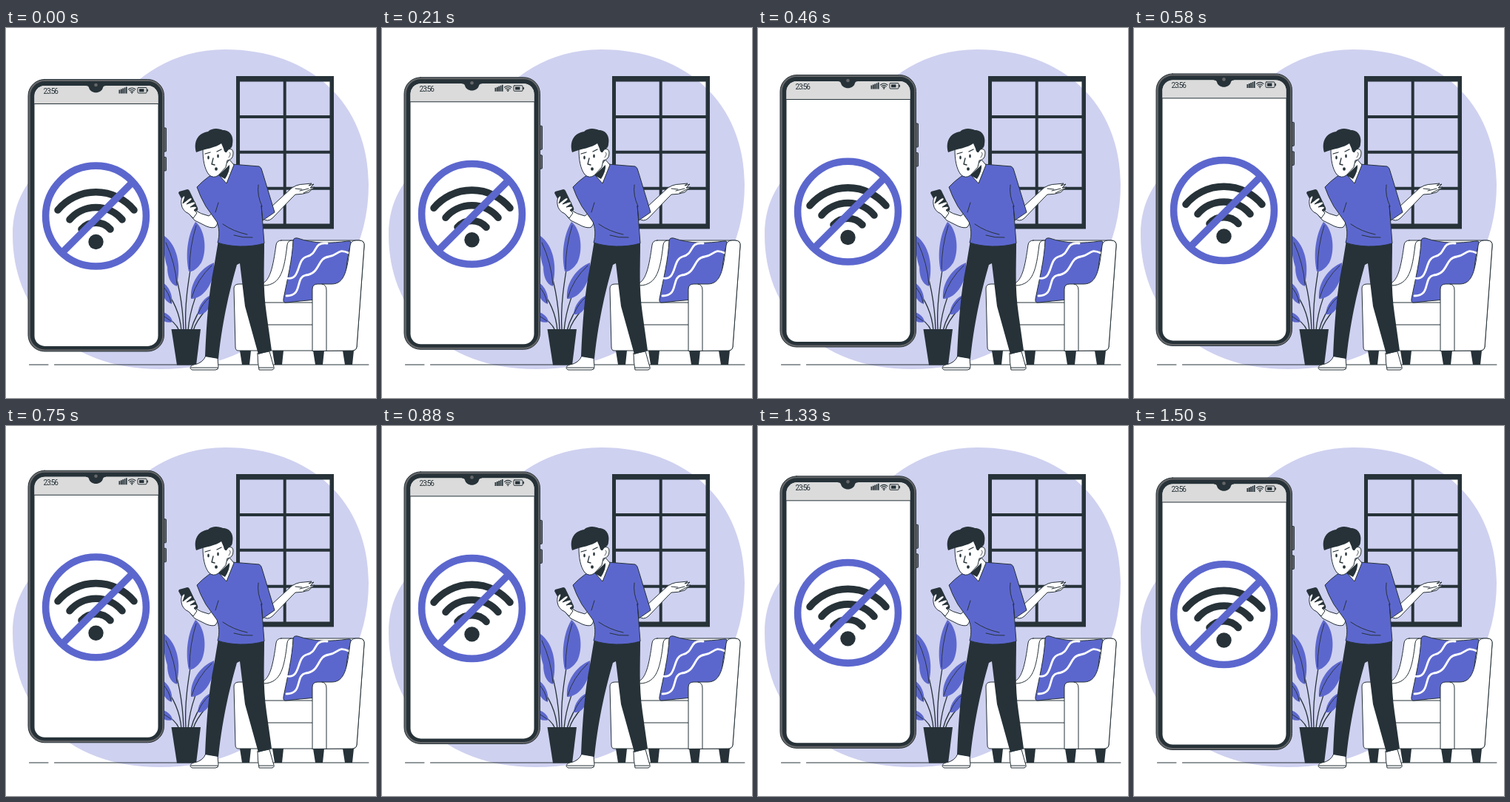
An HTML page for the animation above (1540 ms loop, 500 by 500 pixels).

```html
<!DOCTYPE html>
<html lang="en">
<head>
<meta charset="utf-8">
<title>No connection</title>
<style>
  html, body { margin: 0; width: 100%; height: 100%; overflow: hidden; background: #fff; }
  svg { display: block; width: 100vw; height: 100vh; }
  .ink { fill: #263238; }
  .blue { fill: #5c67ce; }
  .pale { fill: #cfd1f0; }
  .line { fill: none; stroke: #263238; stroke-linecap: round; stroke-linejoin: round; }
  .edge { stroke: #263238; stroke-linejoin: round; stroke-linecap: round; }
  .white { fill: #fff; }
  .clock { font: 10px Roboto, Arial, sans-serif; letter-spacing: -1.15px; }
</style>
</head>
<body>
<svg viewBox="0 0 500 500" xmlns="http://www.w3.org/2000/svg">
  <path class="pale" d="M296 29C413 29 490 103 490 212C490 292 452 356 388 398C330 434 288 461 208 461C78 461 9 378 9 280C9 185 96 162 140 110C176 66 224 29 296 29Z"/>
  <path class="line" d="M31.500 455H57M65.500 455H490"/>

  <g id="window">
    <path class="ink" fill-rule="evenodd" d="M311 65H443V271.500H311ZM316 72.500V264.500H437.500V72.500Z"/>
    <path class="line" stroke-width="4" d="M376.700 70V266M314 120H440M314 167.800H440M314 216.800H440"/>
  </g>

  <g id="chair">
    <path class="ink" d="M316 436H331L329 455H319ZM360 436H375L373 455H363ZM415 436H430L428 455H418ZM455 436H470L468 455H458Z"/>
    <g class="white edge">
      <path d="M372 287H477Q485 287 484 295L474 431Q473 436 468 436H314Q310 436 310 431L308 352Q308 346 315 346H342C357 346 361 321 365 293Q366 287 372 287Z"/>
      <path fill="none" d="M386 287Q381 287 380 293C376 326 372 347 349 348M348 371H414M350 401H414"/>
      <path class="blue" d="M388 287Q389 283 394 284C417 292 440 291 462 288Q467 287 466 292C460 310 460 329 458 350Q457 363 451 366C428 366 404 368 379 371Q374 372 375 366C380 340 387 313 388 287Z"/>
      <path fill="none" style="stroke:#fff" stroke-width="2.800" d="M379 338C399 342 392 313 406 309C423 305 414 289 434 291M379 362C402 362 390 337 405 334C425 332 420 311 436 309C450 307 448 297 463 304"/>
      <path d="M414 436V353Q414 346 421 346H440C458 346 461 327 465 294Q466 287 473 287H477Q485 287 484 295L474 431Q473 436 468 436Z"/>
      <path fill="none" d="M427 346Q433 347 433 354V436"/>
    </g>
  </g>

  <g id="plant">
    <g class="line" stroke-width="1.300">
      <path d="M240 409C239 374 234 342 217 294M243 409C240 358 253 314 258 268M246 409C249 374 261 347 277 323M250 409C253 396 260 382 273 366M237 409C235 384 224 364 212 350M234 409C230 399 222 393 211 388M253 409C256 398 263 389 271 380"/>
    </g>
    <g class="blue">
      <path d="M256 262C269 272 272 300 264 317C259 325 252 330 247 329C242 308 245 280 256 262Z"/>
      <path d="M214 281C228 291 235 312 233 333L231 349C221 346 218 334 218 323C213 308 212 294 214 281Z"/>
      <path d="M281 317C284 339 269 366 250 366C248 345 262 325 281 317Z"/>
      <path d="M208 342C219 346 226 360 224 373C214 370 208 357 208 342Z"/>
      <path d="M206 383C216 383 224 390 225 397C216 400 208 395 206 383Z"/>
      <path d="M279 360C278 376 271 388 259 387C260 374 268 364 279 360Z"/>
    </g>
    <path class="line" stroke-width=".9" d="M257 267Q248 296 248 326M216 290Q229 318 231 347M278 321Q258 340 251 364M211 348Q221 358 223 371M275 364Q265 373 260 385M208 386L223 396"/>
    <path class="ink" d="M223.500 407H263L257 455.500H231Z"/>
  </g>

  <g id="man">
    <g class="white edge">
      <path d="M270 443L286 446L287 458Q287 462 283 462H252C247 461 249 456 254 455Q266 453 270 443Z"/>
      <path d="M340 440L356 437L361 455Q364 462 359 462H342Q340 453 340 440Z"/>
      <path fill="none" d="M250 459H286M342 459H361"/>
      <path d="M345 245L347 257Q353 263 360 257L386 230L391 225Q401 225 409 222L417 215L411 216L416 211L409 213L413 210L403 211Q391 211 383 219L357 243Z"/>
      <path fill="none" d="M397 220L409 217M402 223L414 217M391 217L400 218"/>
    </g>
    <path class="ink" d="M287 287L349 290C349 325 347 350 352 386L359 436L341 441L323 376L316 318L312 320C304 348 293 390 287 447L269 444C271 397 274 357 281 323Z"/>
    <path class="white edge" d="M253 245Q264 252 274 254L287 244Q288 264 283 269Q279 271 271 268L255 260L248 252Z"/>
    <path class="edge blue" d="M305 184L342 187Q345 188 346 193L363 249L347 260L345 240L349 291C329 297 303 296 286 290C289 280 288 270 285 262L270 241Q262 227 258 215C267 205 279 197 290 191Z"/>
    <path class="line" d="M341 212Q339 226 346 241M287 236L283 249M293 265Q307 275 326 279M308 280Q320 284 333 283"/>
    <path class="white edge" d="M289 194L302 178L308 185L298 210L288 199Z"/>
    <path class="ink" d="M287 199L302 185Q303 193 296 204Z"/>
    <path class="white edge" d="M266 164C266 178 268 190 274 198Q280 204 287 199L297 188L299 179Q307 178 307 169Q307 162 300 164L294 155L272 156Z"/>
    <path class="ink" d="M257 168C253 154 259 142 273 140C279 134 289 136 293 138C304 138 308 148 306 157Q306 162 301 164L298 168Q295 169 294 163L291 156C283 162 270 163 257 168Z"/>
    <path class="line" stroke-width="1.300" d="M269 170L276 168M285 167L291 164M280 176L278 184L282 185"/>
    <path class="line" stroke-width=".8" d="M302 168Q305 170 301 175"/>
    <g class="ink">
      <ellipse cx="273.500" cy="175" rx="1.300" ry="2.500"/>
      <ellipse cx="286.500" cy="173" rx="1.300" ry="2.500"/>
      <ellipse cx="284" cy="190.500" rx="1.900" ry="2.300"/>
      <path d="M234 221L245 218Q247 218 248 220L259 243Q260 247 257 247L247 249L233 223Z"/>
    </g>
    <path class="white edge" d="M239 228Q236 231 237 238Q238 247 247 251L253 257L258 250L254 246L257 244Q259 242 255 241L249 242L255 238Q257 235 253 235L244 238L251 232Q252 229 248 230L239 237L242 228Q241 226 239 228Z"/>
  </g>

  <g id="phone">
    <g fill="#666769" class="edge">
      <rect x="209" y="135.500" width="7.500" height="32" rx="1"/>
      <rect x="209" y="175" width="7.500" height="18.500" rx="1"/>
      <rect x="30" y="70" width="183.500" height="367.500" rx="22"/>
    </g>
    <rect class="ink" x="32.800" y="72.500" width="178.500" height="362.500" rx="19.500"/>
    <rect class="white" x="38.500" y="78.500" width="167" height="352" rx="14"/>
    <path fill="#dbdbdb" d="M38.500 103V92.500A14 14 0 0 1 52.500 78.500H191.500A14 14 0 0 1 205.500 92.500V103Z"/>
    <path class="line" d="M38.500 103H205.500"/>
    <path class="ink" d="M108 77V78.500Q111.500 78.500 112 81C114 90 129 90 131 81Q131.500 78.500 135 78.500V77Z"/>
    <circle cx="121.500" cy="77.500" r="2.300" fill="#666769"/>
    <text class="clock ink" x="50.500" y="89.300">23:56</text>
    <path class="ink" d="M152.500 84H154.300V89H152.500ZM154.900 83H156.700V89H154.900ZM157.300 82H159.100V89H157.300ZM159.700 81H161.300V89H159.700ZM161.900 80H163.600V89H161.900Z"/>
    <path class="line" stroke-width="1.100" d="M165.500 83.500Q170.200 79.500 175 83.500M167 85.300Q170.200 82.800 173.400 85.300M168.600 87Q170.200 85.800 171.800 87"/>
    <circle class="ink" cx="170.200" cy="88.400" r=".9"/>
    <rect class="line" x="178" y="81" width="12" height="7.500" rx="1"/>
    <path class="ink" d="M180 82.700H186.500V86.800H180ZM190.500 83.200H192V86.300H190.500Z"/>

    <g class="line" stroke-width="9.600">
      <path d="M70 246.500A67 67 0 0 1 173 246.500"/>
      <path d="M86 259.500A46.500 46.500 0 0 1 157 259.500"/>
      <path d="M102 272.500A26 26 0 0 1 141 272.500"/>
    </g>
    <circle class="ink" cx="121.500" cy="289.500" r="10.200"/>
    <g fill="none" stroke="#5c67ce" stroke-width="9.600">
      <path d="M75.500 304.500L172 208"/>
      <circle cx="121.500" cy="254.600" r="67.900"/>
    </g>
  </g>
</svg>
<script>
  const LOOP = 1540, STEPS = 37, STEP = 1000 / 24, RISE = 10;
  const phone = document.getElementById('phone');

  // The phone floats up and down at a constant speed, at 24 steps a second.
  function draw(ms) {
    const step = Math.floor((ms % LOOP + 4) / STEP) % STEPS;
    const phase = (step + 1) % STEPS / STEPS;
    const lift = RISE * (1 - Math.abs(2 * phase - 1));
    phone.setAttribute('transform', `translate(0 ${-lift.toFixed(3)})`);
  }

  let start;
  function tick(now) {
    start ??= now;
    draw(now - start);
    requestAnimationFrame(tick);
  }
  draw(0);
  requestAnimationFrame(tick);
</script>
</body>
</html>
```
